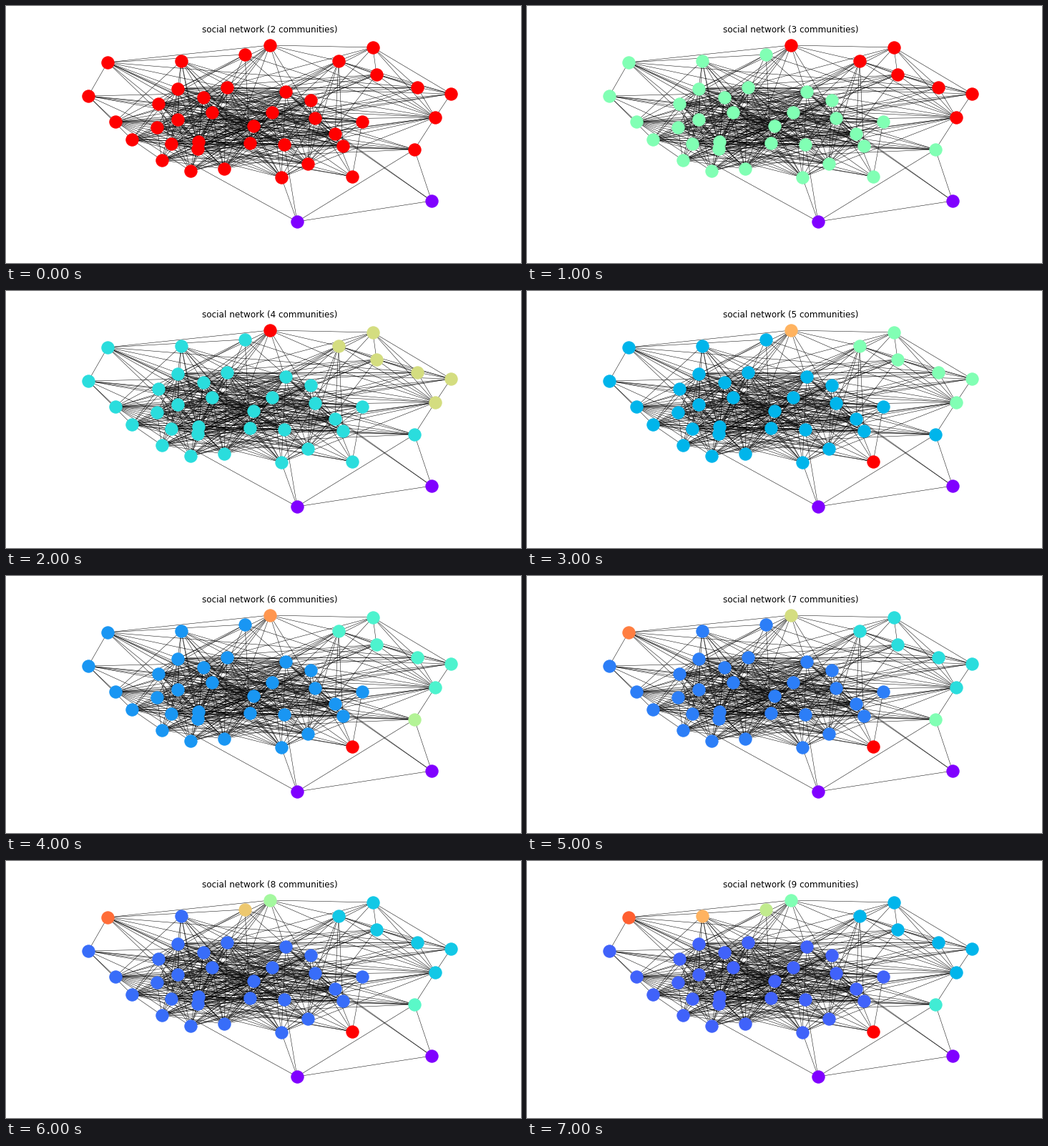
Animation of 720x360 px, one loop 8 s. Source, as a matplotlib script:

```python
import itertools

import matplotlib.pyplot as plt
import numpy as np
from matplotlib.animation import FuncAnimation
from matplotlib.collections import LineCollection

W, H, DPI = 720, 360, 72
FIRST, LAST = 2, 9  # community counts

NODES = np.array([
    (407, 302), (595, 273),
    (465, 77), (513, 58), (518, 96), (575, 114), (622, 123), (600, 156),
    (571, 201), (369, 55), (334, 68), (245, 77), (142, 79), (484, 239),
    (115, 126), (153, 162), (176, 187), (213, 137), (240, 116), (276, 128),
    (309, 114), (211, 170), (240, 159), (288, 149), (231, 193), (269, 190),
    (268, 200), (218, 216), (258, 231), (305, 228), (346, 168), (372, 149),
    (391, 120), (426, 132), (432, 157), (460, 179), (471, 196), (498, 162),
    (341, 192), (389, 194), (422, 221), (385, 240),
])
PAIR, CLIQUE, CORE = range(0, 2), range(2, 8), range(14, 42)

# Links between the outermost nodes
RIM = {(0, 1), (0, 8), (0, 15), (0, 39), (0, 41), (1, 8), (1, 34), (1, 35),
       (3, 9), (9, 12), (10, 12), (12, 14), (14, 15), (14, 16)}

# Members, count at which they split off, and the group they leave,
# in colour order
GROUPS = [(PAIR, 2, None), (CORE, 2, None), (CLIQUE, 3, 1), ([8], 6, 1),
          ([9], 4, 2), ([10], 8, 1), ([11], 9, 1), ([12], 7, 1), ([13], 5, 1)]


def build_edges():
    """Central nodes know nearly everyone, remote ones only the centre."""
    rng = np.random.default_rng(7)
    offset = (NODES - (330, 165)) / (250, 100)
    weight = np.exp(-(offset ** 2).sum(axis=1))
    edges = RIM | set(itertools.combinations(CLIQUE, 2))
    for a, b in itertools.combinations(range(len(PAIR), len(NODES)), 2):
        if rng.random() < 1.5 * weight[a] * weight[b] - 0.1:
            edges.add((a, b))
    return sorted(edges)


def group_color(g, count):
    while GROUPS[g][1] > count:
        g = GROUPS[g][2]
    rank = sum(start <= count for _, start, _ in GROUPS[:g])
    return plt.cm.rainbow(rank / (count - 1))


fig = plt.figure(figsize=(W / DPI, H / DPI), dpi=DPI, facecolor="white")
ax = fig.add_axes([0, 0, 1, 1])
ax.set_xlim(0, W)
ax.set_ylim(H, 0)
ax.axis("off")

ax.add_collection(LineCollection([NODES[list(e)] for e in build_edges()],
                                 colors="black", linewidths=0.5, zorder=1))
dots = [ax.scatter(*NODES[list(members)].T, s=300, linewidths=1, zorder=2)
        for members, _, _ in GROUPS]
title = ax.text(369, 37, "", ha="center", va="baseline", fontsize=12,
                family="DejaVu Sans")


def update(i):
    count = FIRST + i
    for g, dot in enumerate(dots):
        dot.set_color(group_color(g, count))
    title.set_text(f"social network ({count} communities)")
    return *dots, title


anim = FuncAnimation(fig, update, frames=LAST - FIRST + 1, interval=1000,
                     repeat=True, repeat_delay=0)
plt.show()
```
